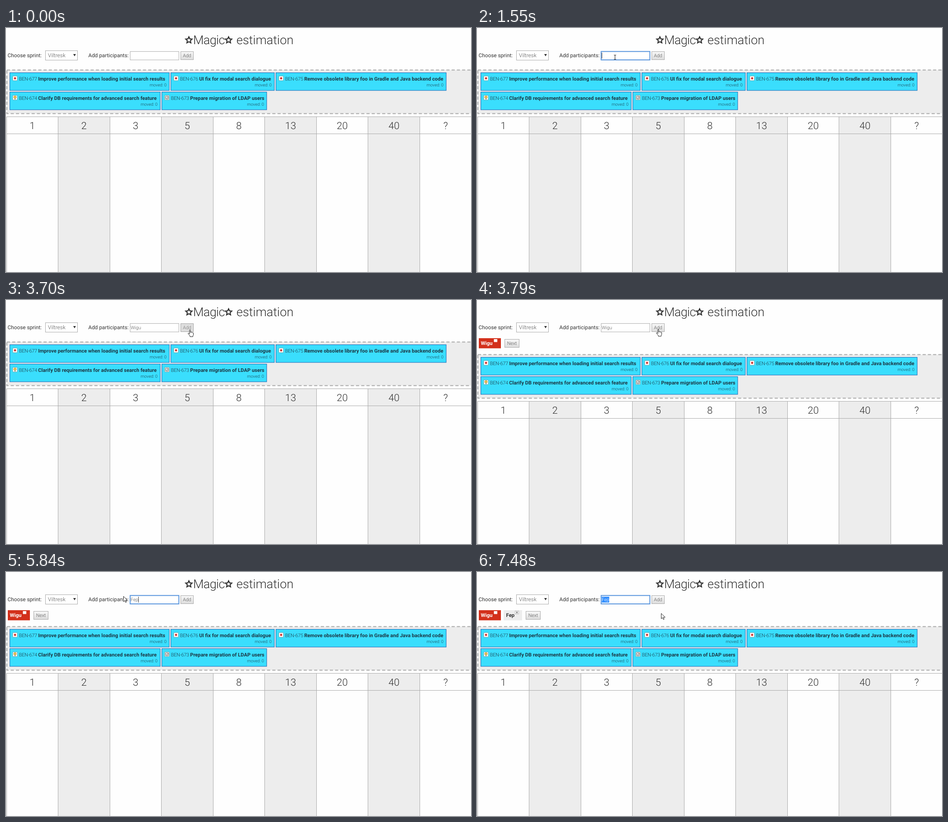
Animation of 1031x543 px, one loop 8 s. Source, as an HTML page:

```html
<!DOCTYPE html>
<html lang="en">
<head>
<meta charset="utf-8">
<title>Magic estimation</title>
<style>
  html, body { margin: 0; width: 100%; height: 100%; overflow: hidden; background: #fefefe; }
  svg { display: block; width: 1031px; height: 543px; font-family: Roboto, "Open Sans", sans-serif; text-rendering: geometricPrecision; }
  text { fill: #333; white-space: pre; }
  .title { font-size: 27.2px; font-weight: 300; }
  .label { font-size: 11.8px; }
  .head { font-size: 22px; font-weight: 300; text-anchor: middle; }
  .key { font-size: 11px; font-weight: 300; letter-spacing: -.3px; fill: #1d3f4b; }
  .task { font-size: 11.15px; font-weight: 600; fill: #1c3844; }
  .moved { font-size: 9.4px; font-weight: 300; text-anchor: end; fill: #1d4654; }
  .pick { font-size: 12px; font-weight: 300; fill: #555; }
  .typed { font-size: 10.3px; font-weight: 300; fill: #555; }
  .btn { font-size: 10.6px; font-weight: 300; text-anchor: middle; fill: #555; }
  .who { font-size: 11.4px; font-weight: 700; }
  .down rect { fill: #dedede; stroke: #a4a4a4; }
  .down text { fill: #777; }
  #field { fill: #fff; stroke: #aaa; }
  #field.focus { stroke: #5a96dd; stroke-width: 2; }
</style>
</head>
<body>
<svg viewBox="0 0 1031 543">
  <defs>
    <linearGradient id="face" x2="0" y2="1">
      <stop stop-color="#f8f8f8"/><stop offset="1" stop-color="#dcdcdc"/>
    </linearGradient>
  </defs>
  <rect width="1031" height="543" fill="#fefefe"/>

  <g id="stars" fill="none" stroke="#333" stroke-width="2.3"></g>
  <text class="title" x="415" y="36" letter-spacing="-.7">Magic</text>
  <text class="title" x="511" y="36">estimation</text>

  <text class="label" x="3.5" y="65">Choose sprint:</text>
  <rect x="87.5" y="50.5" width="71" height="21" fill="#fff" stroke="#aaa"/>
  <text class="pick" x="93" y="65">Viltresk</text>
  <path d="M149 58h6l-3 5z" fill="#333"/>

  <text class="label" x="182.5" y="65">Add participants:</text>
  <rect id="field" x="275.3" y="52.3" width="108" height="18.7"/>
  <rect id="mark" x="276.5" y="55" height="13" fill="#338fff"/>
  <text id="typed" class="typed" x="276.5" y="65"></text>
  <rect id="caret" y="55" width="1" height="13" fill="#333"/>
  <g id="add"></g>

  <g id="people">
    <rect x="4" y="85" width="49" height="22.5" fill="#d3301b"/>
    <text class="who" x="8.5" y="100" style="fill:#fff">Wigu</text>
    <rect x="37.5" y="87" width="7.5" height="6.5" fill="#fff"/>
    <g id="second">
      <rect x="59" y="85" width="41" height="22.5" fill="#ededed"/>
      <text class="who" x="64.5" y="100">Fep</text>
      <rect x="84.5" y="86.5" width="8" height="7" fill="#f6f6f6" stroke="#aaa" stroke-width=".7"/>
      <path d="M87 88l3 4m0-4l-3 4" stroke="#333" stroke-width=".9"/>
    </g>
    <g id="next"></g>
  </g>

  <g id="board">
    <path d="M2 93.5H1040V190.5H2z" fill="#ededed" stroke="#aaa" stroke-width="2" stroke-dasharray="7 4.6"/>
    <g id="cards"></g>
    <g id="columns"></g>
  </g>

  <g id="cursor" stroke-linejoin="round" stroke-linecap="round">
    <path id="arrow" d="M.5.5V12l2.7-2.5 2 4.3 1.9-.9-2-4.1h3.7z" fill="#fff" stroke="#222" stroke-width="1"/>
    <path id="beam" d="M-2-5Q0-5 0-4Q0-5 2-5M0-4V4M-2 5Q0 5 0 4Q0 5 2 5" fill="none" stroke="#222" stroke-width="1.1"/>
    <path id="hand" d="M-1 1Q0-.4 1 1V6Q2.2 5 3.2 6.2 4.6 5.4 5.5 6.8 7.3 6.2 7.5 8V11Q7.3 12.6 6.3 14V15.7H0V14Q-2 11.5-4.3 8.8-4.5 7.4-2.6 7.9L-1 9.3z" fill="#fff" stroke="#222" stroke-width="1"/>
  </g>
</svg>
<script>
const $ = id => document.getElementById(id);
const put = (id, markup) => $(id).innerHTML += markup;
const show = (id, on) => $(id).setAttribute('visibility', on ? 'inherit' : 'hidden');
const LOOP = 8000;

function star(cx, cy) {
  const pts = Array.from({ length: 10 }, (_, i) => {
    const r = i % 2 ? 3.6 : 7.4, a = i * Math.PI / 5;
    return [cx + r * Math.sin(a), cy - r * Math.cos(a)].map(v => v.toFixed(2));
  });
  return `<polygon points="${pts.join(' ')}"/>`;
}

function button(x, y, w, label) {
  return `<rect x="${x}" y="${y}" width="${w}" height="18" fill="url(#face)" stroke="#aaa"/>
    <text class="btn" x="${x + w / 2}" y="${y + 12.7}">${label}</text>`;
}

const icons = {
  bug: '<circle cx="5" cy="5" r="2.4" fill="#d2322b"/>',
  idea: '<circle cx="5" cy="4" r="2.8" fill="#f2c84b" stroke="#8a6d2b" stroke-width=".7"/><path d="M4 7.5h2v1.5h-2z" fill="#555"/>',
  todo: '<path d="M2 2h6v6h-6zM3.5 5l1.3 1.4L7.5 3" fill="none" stroke="#444" stroke-width=".9"/>'
};

function card(x, y, w, num, icon, task) {
  return `<g transform="translate(${x} ${y})">
    <rect x=".5" y=".5" width="${w - .5}" height="39.5" fill="#3adefd" stroke="#1b62b4"/>
    <g transform="translate(7 8)"><rect width="10" height="10" rx="1.5" fill="#fff" stroke="#776" stroke-width=".6"/>${icons[icon]}</g>
    <text class="key" x="20.7" y="17.5">BEN-${num}</text>
    <text class="task" x="63.2" y="17.5">${task}</text>
    <text class="moved" x="${w - 6}" y="30.5">moved: 0</text></g>`;
}

function column(label, i) {
  const w = 114.55, x = Math.floor(1 + i * w);
  return `<rect x="${x}" y="198" width="115" height="400" fill="${i % 2 ? '#ededed' : '#fefefe'}"/>
    <path d="M${x + .5} 198V600" stroke="#aaa"/>
    <text class="head" x="${1 + (i + .5) * w}" y="225">${label}</text>`;
}

put('stars', star(405.5, 27) + star(493.5, 27));
put('add', button(387.5, 52.5, 28, 'Add'));
put('next', button(61.5, 87.5, 32, 'Next'));
put('cards', [
  [8, 99, 354, 677, 'bug', 'Improve performance when loading initial search results'],
  [365, 99, 230, 676, 'bug', 'UI fix for modal search dialogue'],
  [598, 99, 378, 675, 'bug', 'Remove obsolete library foo in Gradle and Java backend code'],
  [8, 142, 334, 674, 'idea', 'Clarify DB requirements for advanced search feature'],
  [345, 142, 233, 673, 'todo', 'Prepare migration of LDAP users']
].map(c => card(...c)).join(''));
put('columns', [1, 2, 3, 5, 8, 13, 20, 40, '?'].map(column).join('') +
  '<path d="M1 197.5H1031M1 235.5H1031" stroke="#aaa"/>');

// Pointer moves: start, end, number of steps
const moves = [[340, 710, 5], [1080, 1230, 3], [2930, 3700, 10], [3790, 4380, 8], [5840, 6610, 10], [6700, 7480, 10]];
// Pointer path: time, x, y
const path = [
  [340, 70, 317], [525, 253, 70], [710, 238, 28],
  [1080, 246, 36], [1230, 306, 65],
  [2930, 318, 67], [3272, 457, 72], [3358, 455, 73], [3530, 412, 68], [3700, 408, 66],
  [3790, 402, 65], [3960, 310, 62], [4130, 281, 61], [4380, 254, 57],
  [5840, 260, 54], [6010, 308, 34], [6095, 340, 33], [6350, 402, 62], [6610, 402, 62],
  [6700, 398, 62], [6870, 320, 62], [7130, 193, 60], [7220, 205, 66], [7390, 380, 90], [7480, 408, 92]
];
const typing = [['Wigu', [2230, 2410, 2500, 2660]], ['Fep', [5060, 5310, 5400]]];

function pointer(t) {
  const move = moves.filter(m => m[0] <= t).pop();
  if (!move) return null;
  const [from, to, n] = move, dt = (to - from) / (n - 1);
  const at = from + dt * Math.min(n - 1, Math.floor((t - from) / dt + .02));
  const i = path.findIndex(p => p[0] >= at - .01);
  const b = path[i < 0 ? path.length - 1 : i], a = path[Math.max(0, i - 1)];
  const k = b[0] > a[0] ? Math.min(1, (at - a[0]) / (b[0] - a[0])) : 1;
  return [a[1] + (b[1] - a[1]) * k, a[2] + (b[2] - a[2]) * k];
}

function draw(t) {
  const during = (...spans) => spans.some(([a, b]) => t >= a && t < b);

  const [name, times] = typing[t < 5060 ? 0 : 1];
  const typed = $('typed');
  typed.textContent = name.slice(0, times.filter(k => k <= t).length);
  const width = typed.textContent ? typed.getComputedTextLength() : 0;

  const focus = during([1470, 3612], [3955, 6432], [6870, LOOP]);
  $('field').setAttribute('class', focus ? 'focus' : '');

  const marked = during([4205, 5060], [7045, LOOP]);
  show('mark', marked);
  $('mark').setAttribute('width', width);
  typed.style.fill = marked ? '#fff' : '';
  show('caret', during([1550, 2010], [2230, 3612], [5060, 6432]));
  $('caret').setAttribute('x', 276.5 + width);

  $('add').setAttribute('class', during([3612, 3790], [6432, 6610]) ? 'down' : '');
  show('people', t >= 3790);
  show('second', t >= 6610);
  $('next').setAttribute('transform', `translate(${t >= 6610 ? 47 : 0} 0)`);
  $('board').setAttribute('transform', `translate(0 ${t >= 3790 ? 28 : 0})`);

  const pos = pointer(t);
  show('cursor', pos);
  if (!pos) return;
  const [x, y] = pos, inRow = y >= 52 && y <= 71;
  const kind = inRow && x >= 275 && x <= 384 ? 'beam' : inRow && x >= 387 && x <= 416 ? 'hand' : 'arrow';
  ['arrow', 'beam', 'hand'].forEach(id => show(id, id === kind));
  $('cursor').setAttribute('transform', `translate(${x.toFixed(1)} ${y.toFixed(1)})`);
}

const start = performance.now();
function tick() {
  draw((performance.now() - start) % LOOP);
  requestAnimationFrame(tick);
}
tick();
</script>
</body>
</html>
```
